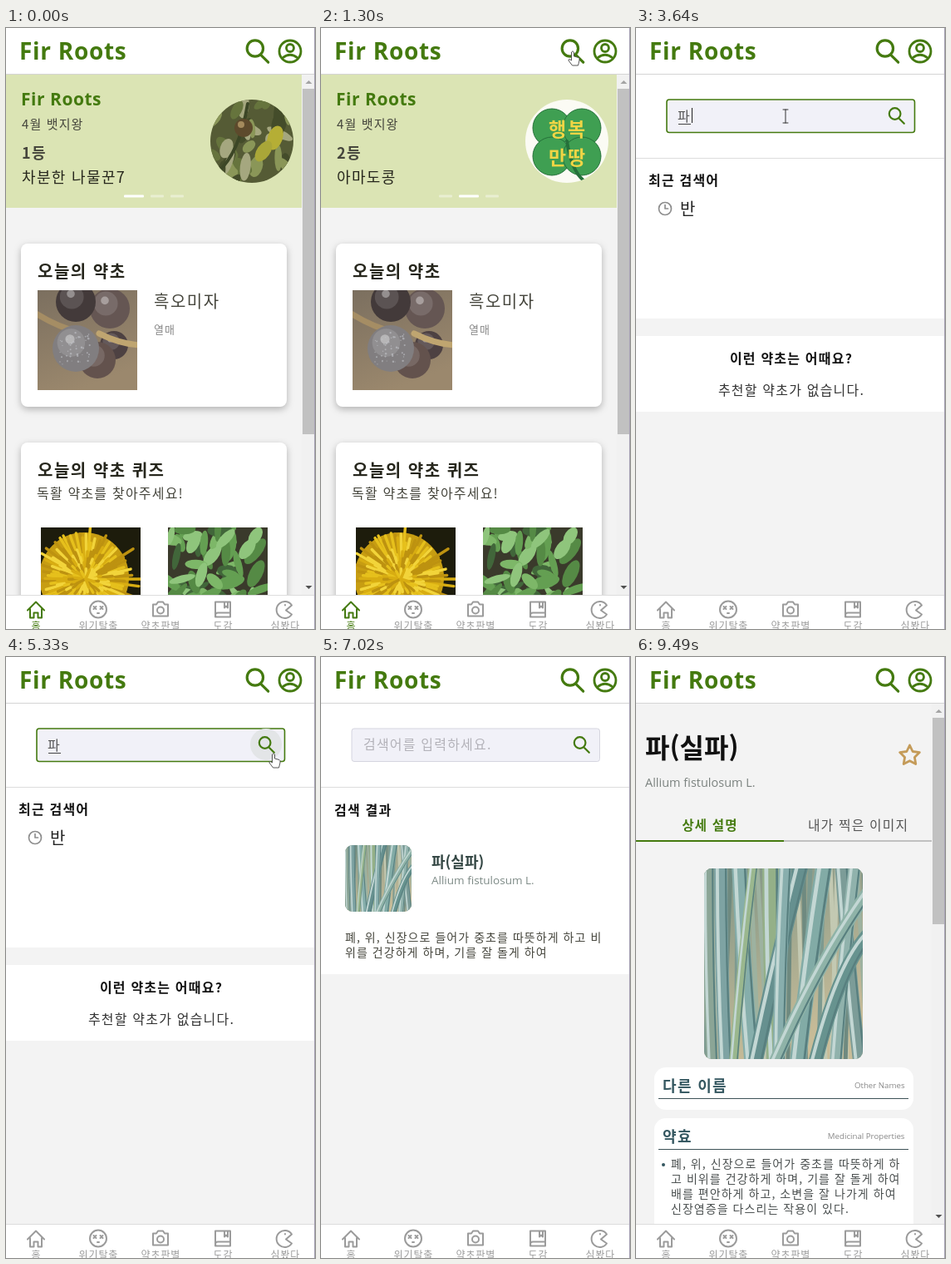
An HTML page that plays this animation: 372x722 px, repeating every 9.75 s.

```html
<!DOCTYPE html>
<html lang="ko">
<head>
<meta charset="utf-8">
<style>
html, body { margin: 0; width: 100%; height: 100%; overflow: hidden; background: #fff; }
svg { display: block; width: 372px; height: 722px; }
text { font-family: 'Noto Sans CJK KR', 'Noto Sans CJK', sans-serif; letter-spacing: .075em; }
.brand { font-family: 'Open Sans', 'Noto Sans', sans-serif; font-weight: 700; letter-spacing: .025em; }
.latin { font-family: 'Open Sans', 'Noto Sans', sans-serif; letter-spacing: 0; }
.b { font-weight: 700; }
.tight { letter-spacing: 0; }
.mid { text-anchor: middle; }
.end { text-anchor: end; }
.line { fill: none; stroke-linecap: round; stroke-linejoin: round; }
.card { fill: #fff; filter: drop-shadow(0 3px 4px #0004); }
</style>
</head>
<body>
<svg id="stage" viewBox="0 0 372 722"></svg>
<script>
const GREEN = '#447a0f', DARK = '#26261c', INK = '#45453c', GREY = '#9b9b9b', PAGE = '#f3f3f3', TEAL = '#345760';
const LOOP = 9750, STEP = 130, SLIDE = 356;
const SEARCH_AT = 1430, FOCUS_AT = 2470, TYPE_AT = 3510, RESULTS_AT = 5850, DETAIL_AT = 8190;
const $ = id => document.getElementById(id);

let seed = 7;
const rnd = (a = 0, b = 1) => {
  seed = (seed * 16807) % 2147483647;
  return a + (b - a) * seed / 2147483647;
};
const pick = list => list[Math.floor(rnd(0, list.length))];
const repeat = (n, f) => Array.from({ length: n }, (_, i) => f(i)).join('');

const text = (x, y, size, s, cls = '', fill = INK) =>
  `<text x="${x}" y="${y}" font-size="${size}" class="${cls}" fill="${fill}">${s}</text>`;
const rect = (x, y, w, h, fill, r = 0, more = '') =>
  `<rect x="${x}" y="${y}" width="${w}" height="${h}" rx="${r}" fill="${fill}" ${more}/>`;
const circle = (x, y, r, fill, more = '') => `<circle cx="${x}" cy="${y}" r="${r}" fill="${fill}" ${more}/>`;
const line = (d, color, w, more = '') =>
  `<path class="line" d="${d}" stroke="${color}" stroke-width="${w}" ${more}/>`;
const group = (id, body, more = '') => `<g id="${id}" ${more}>${body}</g>`;
const photo = (id, x, y, w, h) =>
  `<use href="#${id}" x="${x}" y="${y}" width="${w}" height="${h}"/>`;
const symbol = (id, w, h, body) =>
  `<symbol id="${id}" viewBox="0 0 ${w} ${h}" preserveAspectRatio="xMidYMid slice">${body}</symbol>`;
const ellipse = (x, y, rx, ry, turn, fill) =>
  `<ellipse rx="${rx}" ry="${ry}" fill="${fill}" transform="translate(${x} ${y}) rotate(${turn})"/>`;

// Simplified photographs
const berry = (x, y, r, fill) => circle(x, y, r, fill) +
  circle(x - r * .2, y - r * .25, r * .6, '#fff', 'opacity=".13"') +
  circle(x - r * .25, y - r * .4, r * .2, '#fff', 'opacity=".35"');

const berries = rect(0, 0, 120, 120, 'url(#brown)') +
  line('M-5 26Q25 45 50 50', '#a58d64', 7) +
  berry(92, 66, 17, '#4d4142') + berry(72, 84, 22, '#63524d') +
  berry(87, 22, 24, '#655653') + berry(46, 14, 24, '#433a3a') +
  line('M74 52Q98 64 122 66', '#bfa570', 7) + berry(46, 70, 28, '#817e80') +
  repeat(45, () => circle(46 + rnd(-19, 19), 70 + rnd(-19, 19), rnd(.5, 1.3), '#c3c5ca', 'opacity=".6"'));

const dandelion = rect(0, 0, 120, 120, '#1d1c0c') + circle(52, 60, 54, '#c79d12') +
  repeat(190, i => {
    const a = i * 2.4, r = rnd(52, 72) * (1 - i / 230);
    const x = 54 + r * Math.cos(a), y = 62 + r * Math.sin(a);
    return line(`M54 62L${x.toFixed(1)} ${y.toFixed(1)}`, pick(['#e6c01c', '#d8ad12', '#f2d43a', '#bd9210']), 3.4);
  });

const leaves = rect(0, 0, 120, 120, '#3a3a2b') +
  repeat(85, () => ellipse(rnd(0, 112), rnd(0, 120), rnd(11, 19), rnd(4, 8), rnd(0, 180),
    pick(['#649f52', '#7db768', '#558a45', '#8fc57c', '#41663a'])));

const sprig = rect(0, 0, 100, 100, '#555b35') +
  repeat(34, () => ellipse(rnd(0, 100), rnd(0, 100), rnd(9, 17), rnd(4, 8), rnd(20, 150),
    pick(['#66743d', '#8a9658', '#444c2a', '#a5a77f']))) +
  ellipse(78, 46, 9, 15, 20, '#b5ae35') + ellipse(64, 62, 8, 14, 35, '#a9a638') +
  line('M8 88Q35 65 45 5', '#3c4626', 4) + circle(40, 34, 11, '#5d4a2c') + circle(37, 30, 4, '#a48a5c');

const clover = rect(0, 0, 100, 100, '#fbfbf4') +
  [[32, 34], [68, 34], [32, 68], [68, 68]].map(([x, y]) => circle(x, y, 23, '#3f9f52', 'stroke="#25703a"')).join('') +
  line('M50 50Q56 86 70 97', '#25703a', 4) +
  text(51, 44, 23, '행복', 'b mid', '#f0d545') + text(51, 78, 23, '만땅', 'b mid', '#f0d545');

// Each stalk: top x, bottom x, top y, width, color
const stalks = [
  [5, 10, 0, 14, '#8ba596'], [80, 86, 0, 20, '#94b088'], [165, 188, 0, 16, '#7c9c98'],
  [20, 26, 0, 16, '#7ea3a3'], [42, 58, 0, 18, '#86aeab'], [145, 112, 0, 20, '#82aba6'],
  [182, 158, 0, 15, '#90b2ac'], [60, 35, 0, 11, '#9ab78e'], [118, 60, 0, 18, '#66908f'],
  [98, 90, 0, 15, '#88aead'], [196, 82, 38, 15, '#8fb3a8'], [200, 132, 85, 17, '#67938f']];
const scallion = rect(0, 0, 191, 229, 'url(#straw)') +
  repeat(26, i => line(`M${i * 8} 0L${i * 8 + rnd(-14, 14)} 229`, pick(['#9db2a0', '#7d9a90', '#c3c9b2', '#6f8a80']), 5)) +
  stalks.map(([a, b, y, w, c]) => {
    const path = k => `M${a + k} ${y - 8}Q${(a + b) / 2 + k - 3} 115 ${b + k} 240`;
    return line(path(0), c, w) + line(path(-w * .26), '#c3d7d4', w * .24) + line(path(w * .38), '#587f7f', w * .14);
  }).join('');

// Shared pieces
const magnifier = (x, y, k, w) =>
  line('M6 6L15 15M8 -4A11 11 0 1 1 -14 -4A11 11 0 1 1 8 -4Z', GREEN, w / k, `transform="translate(${x} ${y}) scale(${k})"`);

const header = rect(0, 0, 372, 55, '#fff') + rect(0, 55, 372, 1, '#d5d5d5') +
  text(16, 38, 28, 'Fir Roots', 'brand', GREEN) + magnifier(302.5, 28, .88, 3.2) +
  line('M355 28A13 13 0 1 1 329 28A13 13 0 1 1 355 28ZM346.5 24A4.5 4.5 0 1 1 337.5 24A4.5 4.5 0 1 1 346.5 24ZM333 36Q342 28.5 351 36', GREEN, 2.8);

const tabs = [
  ['홈', 'M-10 1L0 -9L10 1M-7 -1V10H-2.5V4H2.5V10H7V-1'],
  ['위기탈출', 'M10 0A10 10 0 1 1 -10 0A10 10 0 1 1 10 0ZM-5.5 -3.500L-2.5 -.5M-2.5 -3.500L-5.5 -.5M2.5 -3.500L5.5 -.5M5.5 -3.500L2.5 -.5M-1 4.500H1'],
  ['약초판별', 'M-9 -6H-5L-3 -9H3L5 -6H9V8H-9ZM4 1A4 4 0 1 1 -4 1A4 4 0 1 1 4 1Z'],
  ['도감', 'M-9 9V-9H9V9H-7Q-9 9 -9 7Q-9 4 -6 4H9M2 -9V-2L4 -4L6 -2V-9'],
  ['심봤다', 'M8 -5A10 10 0 1 0 8 6L1 1ZM0 -5.5V-5']];
const nav = rect(0, 681, 372, 41, '#fff') + rect(0, 681, 372, 1, '#ddd') +
  tabs.map(([label, d], i) => `<g class="tab">` +
    line(d, 'currentColor', 2, `transform="translate(${36 + i * 75} 698.5)"`) +
    text(36.4 + i * 75, 722.5, 12, label, 'mid', 'currentColor') + '</g>').join('');

const scrollbar = end => rect(356, 56, 16, 625, '#f1f1f1') + rect(357, 73, 14, end - 73, '#c1c1c1') +
  '<path d="M360.500 67l4-4 4 4z" fill="#a3a3a3"/><path d="M360.500 670l4 4 4-4z" fill="#505050"/>';

// Screens
const slide = (i, rank, name, image) => `<g transform="translate(${i * SLIDE} 0)">` +
  text(18, 93, 21, 'Fir Roots', 'brand', GREEN) + text(19, 121, 15, '4월 뱃지왕') +
  text(19, 157, 18, rank, 'b', INK) + text(19, 186, 18, name, '', DARK) +
  `<g clip-path="url(#round)">${photo(image, 246, 86, 100, 100)}</g></g>`;

const home = rect(0, 56, 372, 626, PAGE) + rect(0, 56, SLIDE, 160, '#dbe4b4') +
  `<g clip-path="url(#banner)">` +
  group('track', slide(0, '1등', '차분한 나물꾼7', 'sprig') + slide(1, '2등', '아마도콩', 'clover')) + '</g>' +
  repeat(3, i => rect(0, 200.500, 16, 3, '#fff', 1, `id="dot${i}"`)) +
  rect(18, 259, 320, 196, '#fff', 8, 'class="card"') + text(38, 300, 20, '오늘의 약초', 'b', DARK) +
  photo('berries', 38, 315, 120, 120) + text(178, 336, 20, '흑오미자') + text(178, 367, 13, '열매', '', '#888') +
  rect(18, 498, 320, 230, '#fff', 8, 'class="card"') + text(38, 539, 20, '오늘의 약초 퀴즈', 'b', DARK) +
  text(37, 565, 16, '독활 약초를 찾아주세요!') +
  photo('dandelion', 42, 600, 120, 120) + photo('leaves', 195, 600, 120, 120) + scrollbar(488);

const recent = rect(0, 349, 372, 21, PAGE) + rect(0, 461, 372, 221, PAGE) +
  text(15, 189, 16, '최근 검색어', 'b', '#111') +
  line('M42.500 217A7.500 7.500 0 1 1 27.500 217A7.500 7.500 0 1 1 42.500 217ZM35 212.500V217H38.500', '#8e8e8e', 1.7) +
  text(53, 225, 20, '반', '', '#222') +
  text(187, 403, 16, '이런 약초는 어때요?', 'b mid', '#111') + text(187, 441, 16, '추천할 약초가 없습니다.', 'mid', '#333');

const results = rect(0, 381, 372, 301, PAGE) + text(16, 190, 16, '검색 결과', 'b', '#111') +
  `<g clip-path="url(#thumb)">${photo('scallion', 29, 226, 80, 80)}</g>` +
  text(133, 253, 18, '파(실파)', 'b tight', '#344744') + text(133, 273, 13.5, 'Allium fistulosum L.', 'latin', '#7d8a86') +
  text(29, 342, 14, '폐, 위, 신장으로 들어가 중초를 따뜻하게 하고 비') + text(29, 360, 14, '위를 건강하게 하며, 기를 잘 돌게 하여');

const search = rect(0, 56, 372, 626, '#fff') + rect(0, 156, 372, 1, '#ddd') +
  rect(37, 86, 298.5, 39.5, '#f1f1f8', 3, 'id="field"') + circle(313, 105, 19, '#e3e5e7', 'id="hover"') +
  magnifier(313.5, 105.5, .62, 2.2) +
  group('hint', text(51, 110.5, 16, '검색어를 입력하세요.', '', '#b3b2b9')) +
  group('typed', text(50, 112, 16, '파', '', '#555') + rect(51, 115, 15, 1, '#444')) +
  rect(0, 96, 1, 18, '#222', 0, 'id="caret"') +
  group('recent', recent) + group('results', results);

const starPath = repeat(10, i => {
  const r = i % 2 ? 6.2 : 12.5, a = Math.PI * (i / 5 - .5);
  return `${i ? 'L' : 'M'}${(329.5 + r * Math.cos(a)).toFixed(1)} ${(118.5 + r * Math.sin(a)).toFixed(1)}`;
}) + 'Z';
const panel = (y, h, title, note) => rect(22, y, 312, h, '#fff', 14) +
  text(32, y + 29, 18, title, 'b', TEAL) + text(323.5, y + 25, 9.7, note, 'latin end', '#888') +
  rect(27, y + 37, 301, 1, '#3d5257');
const effects = ['폐, 위, 신장으로 들어가 중초를 따뜻하게 하', '고 비위를 건강하게 하며, 기를 잘 돌게 하여',
  '배를 편안하게 하고, 소변을 잘 나가게 하여', '신장염증을 다스리는 작용이 있다.'];
const detail = rect(0, 56, 372, 626, PAGE) + text(11, 121, 32, '파(실파)', 'b tight', '#111') +
  text(11, 156, 14.5, 'Allium fistulosum L.', 'latin', '#7b827f') + line(starPath, '#c49b59', 2.8) +
  text(89, 208, 15.5, '상세 설명', 'b mid', GREEN) + text(267.5, 208, 15.8, '내가 찍은 이미지', 'mid', '#555') +
  rect(178, 220, 178, 2, '#c0c0c0') + rect(0, 220, 178, 2, GREEN) +
  `<g clip-path="url(#large)">${photo('scallion', 82, 254, 191, 229)}</g>` +
  panel(493, 51, '다른 이름', 'Other Names') + panel(554, 140, '약효', 'Medicinal Properties') +
  circle(33, 610, 2, TEAL) + effects.map((s, i) => text(42, 613.5 + i * 18.3, 14, s, '', '#4a4f4f')).join('') +
  scrollbar(321);

const pointers = group('arrow', '<path d="M0 0V13L3 10.300L5.200 15L7.200 14L5 9.500H9Z" fill="#fff" stroke="#444" stroke-width=".9"/>') +
  group('hand', '<path d="M-1.500 9V1Q0 -1.500 1.500 1V6L7 7.500Q8.500 8 8 11L6.500 17H-.5L-5 11Q-5 8 -1.500 11Z" fill="#fff" stroke="#444" stroke-width=".9"/>') +
  group('beam', line('M-3 -8H3M0 -8V8M-3 8H3', '#333', 1));

const gradient = (id, a, b) =>
  `<linearGradient id="${id}" x2=".4" y2="1"><stop stop-color="${a}"/><stop offset="1" stop-color="${b}"/></linearGradient>`;
const clip = (id, shape) => `<clipPath id="${id}">${shape}</clipPath>`;

$('stage').innerHTML = '<defs>' + gradient('brown', '#7b6f5f', '#9b886d') + gradient('straw', '#7d9486', '#c8bc98') +
  clip('banner', rect(0, 56, SLIDE, 160, '#000')) + clip('round', circle(296, 136, 50, '#000')) +
  clip('thumb', rect(29, 226, 80, 80, '#000', 9)) + clip('large', rect(82, 254, 191, 229, '#000', 9)) +
  symbol('berries', 120, 120, berries) + symbol('dandelion', 120, 120, dandelion) + symbol('leaves', 120, 120, leaves) +
  symbol('sprig', 100, 100, sprig) + symbol('clover', 100, 100, clover) + symbol('scallion', 191, 229, scallion) +
  '</defs>' + group('home', home) + group('search', search) + group('detail', detail) + header + nav +
  rect(371, 0, 1, 722, '#aaa5b8') + group('pointer', pointers);

// Pointer route: time, x, y
const route = [
  [390, 150, -24], [520, 149, -5], [1170, 303, 28], [1430, 303, 28], [1950, 246, 76], [2470, 180, 106],
  [4550, 180, 106], [5330, 322, 116], [6500, 322, 116], [6890, 384, 190], [7020, 384, 290],
  [7670, 94, 266], [8580, 94, 266], [9230, 384, 300]];
function pointerAt(t) {
  const i = route.findIndex(p => p[0] >= t);
  if (i < 1) return [384, -24];
  const [t0, x0, y0] = route[i - 1], [t1, x1, y1] = route[i];
  const p = (t - t0) / (t1 - t0), e = p * p * (3 - 2 * p);
  return [x0 + (x1 - x0) * e, y0 + (y1 - y0) * e];
}

const show = (id, on) => { $(id).style.display = on ? '' : 'none'; };
const within = (t, a, b) => t >= a && t < b;

function draw(t) {
  const isHome = t < SEARCH_AT, isDetail = t >= DETAIL_AT, hasResults = t >= RESULTS_AT;
  show('home', isHome);
  show('search', !isHome && !isDetail);
  show('detail', isDetail);
  show('recent', !hasResults);
  show('results', hasResults);
  document.querySelectorAll('.tab').forEach((tab, i) => { tab.style.color = isHome && !i ? GREEN : GREY; });

  const p = Math.min(1, Math.max(0, (t - 120) / 600)), e = 1 - (1 - p) ** 2.3;
  $('track').setAttribute('transform', `translate(${-SLIDE * e} 0)`);
  const k = Math.min(1, p * 2);
  let x = 142;
  [1 - k, k, 0].forEach((on, i) => {
    const dot = $('dot' + i), w = 16 + 8 * on;
    dot.setAttribute('x', x);
    dot.setAttribute('width', w);
    dot.setAttribute('opacity', .4 + .6 * on);
    x += w + 8;
  });

  const focused = within(t, FOCUS_AT, RESULTS_AT), typing = within(t, TYPE_AT, RESULTS_AT);
  $('field').setAttribute('stroke', focused ? GREEN : '#d5d5df');
  $('field').setAttribute('stroke-width', focused ? 1.6 : 1);
  show('hint', !typing);
  show('typed', typing);
  $('typed').firstChild.textContent = t < TYPE_AT + STEP ? 'ㅍ' : '파';
  show('caret', within(t, FOCUS_AT, 3120) || within(t, TYPE_AT, 4160) || within(t, 4680, 5200));
  $('caret').setAttribute('x', typing ? 67 : 51);

  const [px, py] = pointerAt(t);
  const onButton = Math.hypot(px - 313, py - 105) < 20;
  const onInput = !isHome && !isDetail && within(px, 37, 294) && within(py, 86, 125);
  const onLink = onButton && !isHome || Math.hypot(px - 303, py - 28) < 15 ||
    hasResults && !isDetail && within(px, 29, 335) && within(py, 220, 365);
  show('hover', onButton);
  show('beam', onInput);
  show('hand', !onInput && onLink);
  show('arrow', !onInput && !onLink);
  $('pointer').setAttribute('transform', `translate(${px} ${py})`);
}

const start = performance.now();
function tick() {
  const t = (performance.now() - start) % LOOP;
  draw(Math.floor(t / STEP) * STEP);
  requestAnimationFrame(tick);
}
tick();
</script>
</body>
</html>
```
